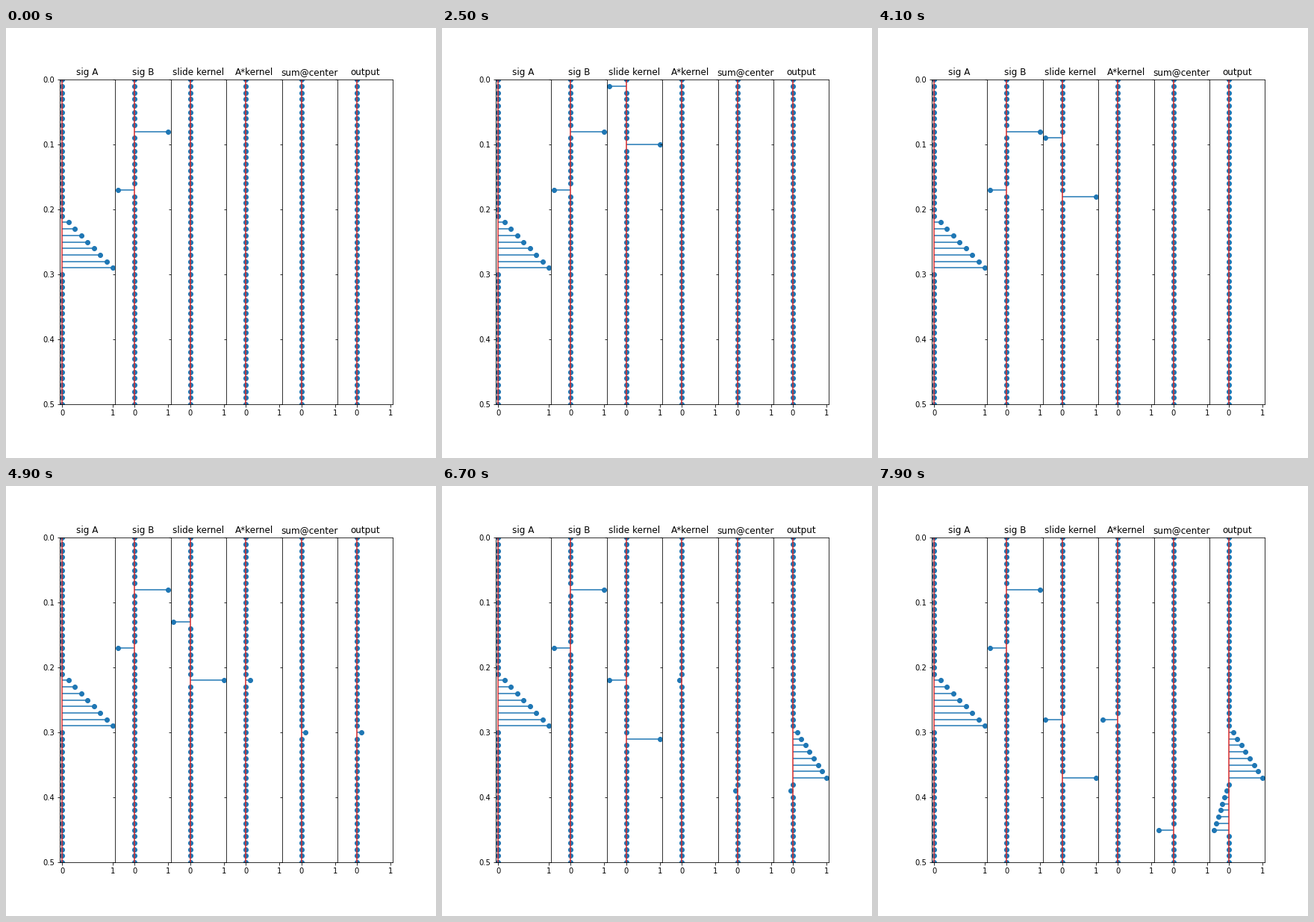
A matplotlib script that plays this animation: 576x576 px, repeating every 8 s.

```python
import numpy as np
import matplotlib.pyplot as plt
from matplotlib.animation import FuncAnimation

N = 51
STEP_MS, HOLD_MS, LOOP_MS, TICK_MS = 200, 500, 8000, 100
CENTER = 8          # offset from the leading tap to where the sum lands
LAG = 9             # distance between the two taps

t = np.arange(N) / 100
sig_a = np.zeros(N)
sig_a[22:30] = np.arange(1, 9) / 8
sig_b = np.zeros(N)
sig_b[CENTER], sig_b[CENTER + LAG] = 1, -0.5


def kernel_at(pos):
    """Flipped copy of sig B with its leading tap at pos."""
    k = np.zeros(N)
    if pos >= 0:
        k[pos] = 1
    if pos >= LAG:
        k[pos - LAG] = -0.5
    return k


def set_stem(stem, values):
    stem.markerline.set_xdata(values)
    stem.stemlines.set_segments([[(0, y), (v, y)] for v, y in zip(values, t)])


fig, axes = plt.subplots(1, 6, sharey=True, figsize=(8, 8), dpi=72,
                         gridspec_kw=dict(wspace=0, left=0.125, right=0.9,
                                          bottom=0.125, top=0.88))
titles = ["sig A", "sig B", "slide kernel", "A*kernel", "sum@center", "output"]
stems = []
for ax, title in zip(axes, titles):
    stems.append(ax.stem(t, np.zeros(N), orientation="horizontal"))
    ax.set_title(title)
    ax.set_xlim(-0.575, 1.075)
    ax.set_xticks([0, 1], ["0", "1"])
axes[0].set_xlim(-0.05, 1.05)
axes[0].set_ylim(0.5, 0)
set_stem(stems[0], sig_a)
set_stem(stems[1], sig_b)


def update(frame):
    pos = (frame * TICK_MS - HOLD_MS) // STEP_MS
    kernel = kernel_at(pos)
    product = sig_a * kernel
    center = np.zeros(N)
    output = np.zeros(N)
    if pos >= 0:
        center[pos + CENTER] = product.sum()
    for p in range(pos + 1):
        output[p + CENTER] = sig_a @ kernel_at(p)
    for stem, values in zip(stems[2:], (kernel, product, center, output)):
        set_stem(stem, values)
    return []


anim = FuncAnimation(fig, update, frames=LOOP_MS // TICK_MS,
                     interval=TICK_MS, repeat=True, repeat_delay=0)
plt.show()
```
